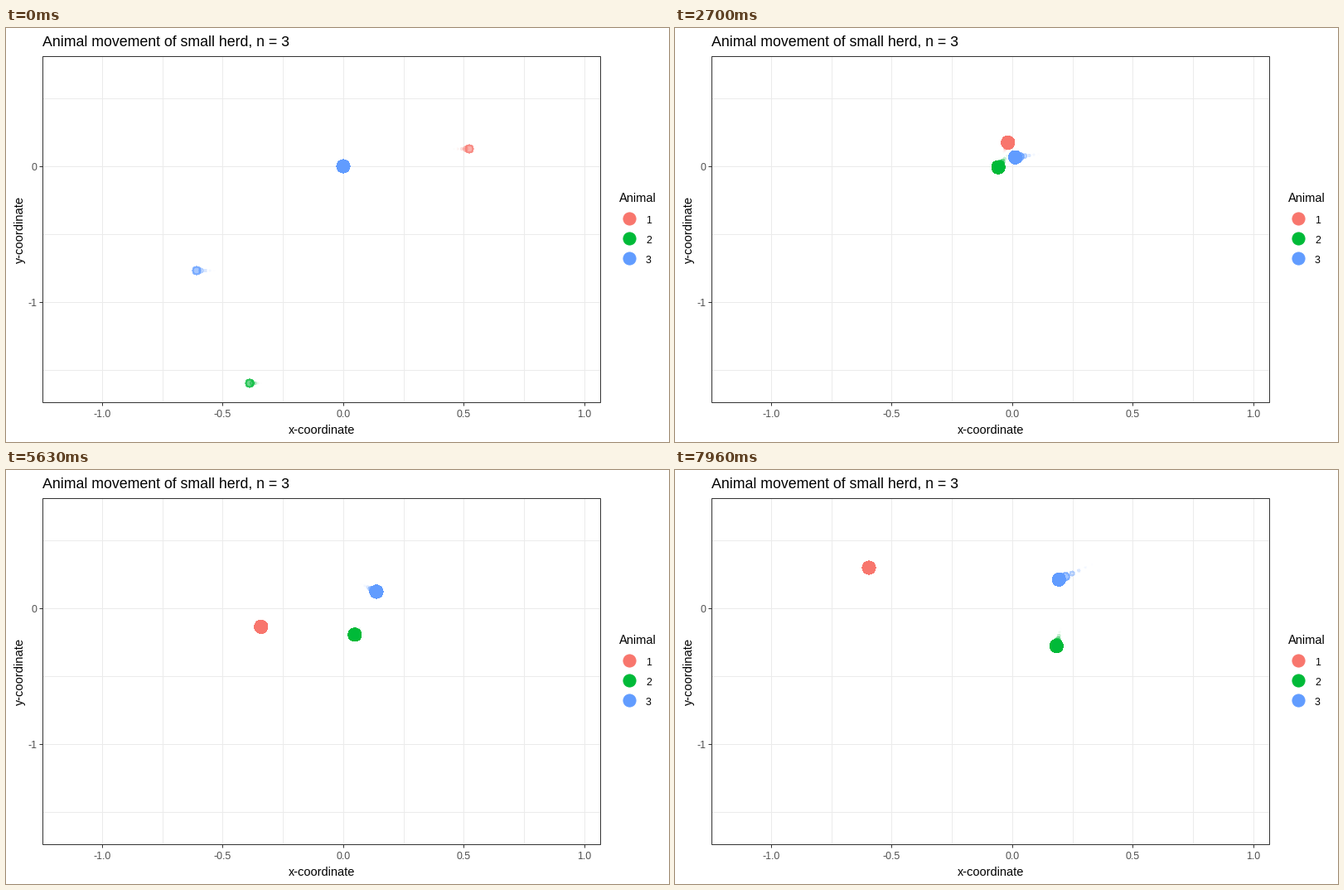
A matplotlib script that plays this animation: 800x500 px, repeating every 8 s.

```python
import numpy as np
import matplotlib.pyplot as plt
from matplotlib.animation import FuncAnimation
from matplotlib.collections import LineCollection
from matplotlib.patches import Rectangle

W, H, DPI = 800, 500, 100
PX = 72 / DPI                  # points per pixel
LOOP, TICK = 8000, 20          # ms
HOLD, STEP = 500, 200 / 3      # ms: opening rest, then one step of motion
LEG = 100 / 14                 # steps between two waypoints
WAKE = 6                       # steps until a trailing dot is gone
WANDER = 10                    # px, spread of the free waypoints
STROKE = 0.945                 # px
COLORS = ["#F8766D", "#00BA38", "#619CFF"]
RGB = [tuple(int(c[i:i + 2], 16) / 255 for i in (1, 3, 5)) for c in COLORS]

plt.rcParams["font.family"] = "Liberation Sans"
plt.rcParams["text.hinting"] = "native"

# Each herd member passes these spots (x + yj) at these legs
ORIGIN = 407 + 167j
KEY_LEGS = [0, 3, 6, 9, 11, 14, 15, 16]
KEYS = [
    [ORIGIN, 394 + 147j, 412 + 119j, 324 + 179j, 307 + 190j, 292 + 139j,
     234 + 118j, 234 + 118j],
    [ORIGIN, 425 + 143j, 391 + 186j, 440 + 172j, 420 + 200j, 437 + 207j,
     466 + 188j, 459 + 218j],
    [ORIGIN, 437 + 170j, 401 + 160j, 406 + 157j, 449 + 148j, 449 + 138j,
     510 + 111j, 453 + 137j],
]
# Wakes already on stage at the start, drifting outwards
ENTRY = [559 + 146j, 294 + 429j, 230 + 293j]


def walk(keys, rng):
    """Straight legs between key spots, with a random nudge at free waypoints."""
    legs = np.arange(KEY_LEGS[-1] + 1)
    free = ~np.isin(legs, KEY_LEGS)
    nudge = rng.normal(0, WANDER, (2, len(legs))) * free
    return np.interp(legs, KEY_LEGS, keys) + nudge[0] + 1j * nudge[1]


rng = np.random.default_rng(3)
PATHS = [walk(keys, rng) for keys in KEYS]


def place(animal, step):
    if step < 0:
        start = ENTRY[animal]
        spot = start + 0.03 * (start - ORIGIN).real * (step + 1)
    else:
        path = PATHS[animal]
        spot = np.interp(step / LEG, np.arange(len(path)), path)
    return spot.real, spot.imag


def area(size):
    diameter = size * 2.845 + STROKE
    return (diameter * PX) ** 2


fig = plt.figure(figsize=(W / DPI, H / DPI), dpi=DPI, facecolor="white")
ax = fig.add_axes([0, 0, 1, 1])
ax.set_xlim(0, W)
ax.set_ylim(H, 0)
ax.axis("off")


def text(x, y, s, px, color="black", **kw):
    ax.text(x, y, s, fontsize=px * PX, color=color, **{"va": "baseline", **kw})


def strokes(segments, color, z):
    ax.add_collection(LineCollection(segments, colors=color, linewidths=PX,
                                     zorder=z, snap=False))


# Panel
left, right, top, bottom = 44.5, 717.5, 34.5, 452.5
xs = np.round(116 + 72.7 * np.arange(9)) + 0.5
ys = 85.5 + 82 * np.arange(5)
strokes([[(x, top), (x, bottom)] for x in xs]
        + [[(left, y), (right, y)] for y in ys], "#EBEBEB", 1)
strokes([[(x, bottom), (x, bottom + 4)] for x in xs[::2]]
        + [[(left - 4, y), (left, y)] for y in ys[1::2]], "#333333", 2)
ax.add_patch(Rectangle((left, top), right - left, bottom - top, fill=False,
                       edgecolor="#333333", linewidth=PX, zorder=6,
                       snap=False))

# Lettering
text(44, 22, "Animal movement of small herd, n = 3", 17.7)
text(381, 490, "x-coordinate", 14.6, ha="center")
text(23.5, 243.5, "y-coordinate", 14.7, rotation=90, ha="right", va="center")
for i, x in enumerate(xs[::2]):
    text(x - 0.5, 470, f"{i / 2 - 1:.1f}", 12.3, "#4D4D4D", ha="center")
for y, s in zip(ys[1::2], ("0", "-1")):
    text(37.5, y + 5, s, 12.3, "#4D4D4D", ha="right")

# Legend
DOT = dict(linewidths=STROKE * PX, antialiaseds=False)
text(740, 210, "Animal", 14.6)
for i, color in enumerate(COLORS):
    y = 230 + 24.2 * i
    ax.scatter([751.7], [y], s=area(5), c=color, edgecolors=color,
               zorder=3, **DOT)
    text(772, y + 5.5, str(i + 1), 12.3)

dots = ax.scatter([], [], zorder=5, **DOT)


def draw(frame):
    t = frame * TICK + 14
    step = 0 if t < HOLD else int((t - HOLD) / STEP) + 1
    spots, sizes, colors = [], [], []
    for lag in reversed(range(WAKE)):
        fade = (1 - lag / WAKE) ** 3
        for animal in range(3):
            spots.append(place(animal, step - lag))
            sizes.append(area(5 * fade))
            colors.append((*RGB[animal], fade))
    dots.set_offsets(spots)
    dots.set_sizes(sizes)
    dots.set_facecolors(colors)
    dots.set_edgecolors(colors)
    return [dots]


anim = FuncAnimation(fig, draw, frames=LOOP // TICK, interval=TICK,
                     init_func=lambda: draw(0), repeat=True, repeat_delay=0)
plt.show()
```
